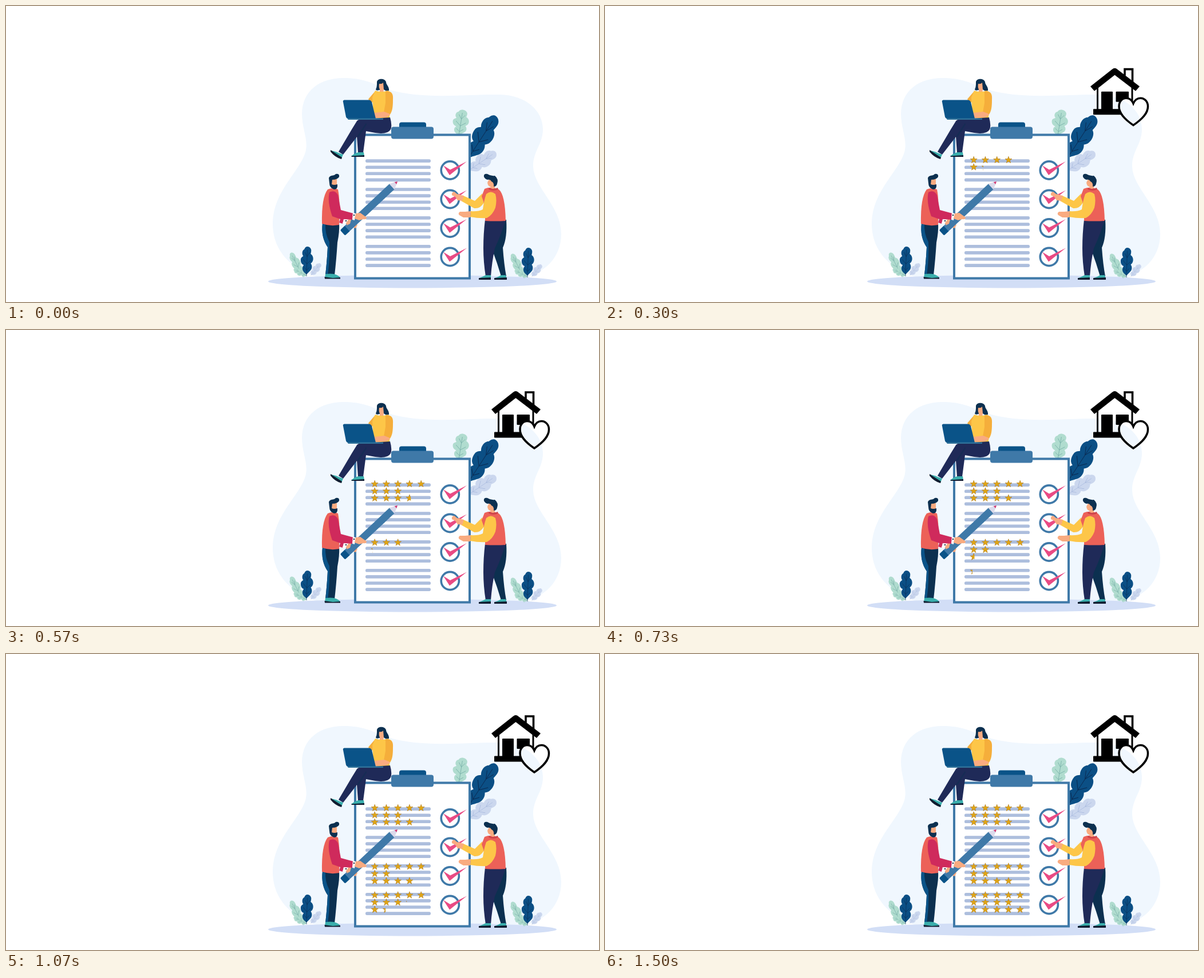
Recreate the animation shown at these times as an HTML page. Size 1036 by 518 pixels, loop 5010 ms.

```html
<!DOCTYPE html>
<html lang="en">
<head>
<meta charset="utf-8">
<title>Checklist</title>
<style>
  html, body { margin: 0; width: 100%; height: 100%; overflow: hidden; background: #fff; }
  #stage { display: block; width: 100vw; height: 100vh; }
  .clip { overflow: hidden; }
  .navy { fill: #1f2a58; } .ink { fill: #0c3050; } .blue { fill: #3f79a8; } .deep { fill: #0a5388; }
  .skin { fill: #f9ab80; } .coral { fill: #ec6158; } .rose { fill: #cf2a5c; }
  .sun { fill: #fdc648; } .amber { fill: #f5ae3b; } .teal { fill: #3aaeac; } .sole { fill: #101c30; }
  .mint { fill: #b0dccf; stroke: #70a9a4; } .pale { fill: #cbd7ee; stroke: #a9bade; }
  .dark { fill: #0b4f85; stroke: #0a2d55; }
</style>
</head>
<body>
<svg id="stage" viewBox="0 0 1036 518" preserveAspectRatio="none">
  <defs>
    <g id="leaf">
      <path stroke="none" d="M0 0C-4-3-11-5-11-11C-11-15-8-16-8-17C-14-18-17-23-16-28C-15-31-11-32-10-33C-14-36-14-43-8-45C-6-49-3-50 0-50C5-50 10-47 10-43C10-40 9-38 9-37C15-35 17-29 15-25C14-22 11-21 10-20C14-17 14-12 11-9C8-6 4-4 0 0Z"/>
      <path fill="none" stroke-width=".8" d="M0 3V-44M0-8L-7-13M0-8L7-13M0-19L-10-27M0-19L10-26M0-32L-6-40M0-32L6-40"/>
    </g>
    <g id="plant">
      <use href="#leaf" class="mint" transform="translate(518 472) rotate(-27) scale(.5 .9)"/>
      <use href="#leaf" class="mint" transform="translate(525 472) rotate(-62) scale(.4 .5)"/>
      <use href="#leaf" class="pale" transform="translate(533 471) rotate(39) scale(.4 .52)"/>
      <use href="#leaf" class="dark" transform="translate(525 470) rotate(2) scale(.68 .98)"/>
    </g>
    <path id="tick" fill="#e94b84" d="M764 279L776 286.5L805 272L775 296Z"/>
    <path id="heart" d="M923 207C907 196 898 186 898 174C898 165 904 159.500 910.500 159.500C917 159.500 921 164 923 169C925 164 929 159.500 935.500 159.500C942 159.500 948.500 165 948.500 174C948.500 186 939 196 923 207Z"/>
    <mask id="cut" maskUnits="userSpaceOnUse" x="840" y="90" width="120" height="130">
      <path fill="#fff" d="M840 90h120v130h-120z"/>
      <use href="#heart"/>
    </mask>
  </defs>

  <path fill="#f0f7fe" d="M590 126C625 126 638 135 665 145C725 165 805 154 862 155C910 156 938 184 938 216C938 242 920 255 921 281C922 318 970 350 970 399C970 440 941 469 900 476H548C500 462 466 430 466 381C466 325 513 290 523 256C529 234 517 216 517 188C518 149 547 126 590 126Z"/>
  <ellipse cx="710" cy="482" rx="252" ry="11.5" fill="#d2def6"/>

  <use href="#plant"/>
  <use href="#plant" x="386" y="2"/>
  <use href="#leaf" class="mint" transform="translate(791 227) rotate(9) scale(.88 .92)"/>
  <use href="#leaf" class="pale" transform="translate(808 288) rotate(56) scale(.8 1.15)"/>
  <use href="#leaf" class="dark" transform="translate(808 266) rotate(33) scale(1.12 1.75)"/>

  <!-- clipboard -->
  <rect x="610" y="225.5" width="200" height="251" fill="#fff" stroke="#3f79a8" stroke-width="4"/>
  <rect class="deep" x="687" y="203.5" width="47" height="14" rx="4"/>
  <rect class="blue" x="673" y="211.5" width="74" height="21" rx="4"/>
  <g id="lines" fill="#adbedd"></g>
  <g id="checks" fill="none" stroke="#3f79a8" stroke-width="3.6"></g>

  <!-- woman with laptop -->
  <path class="ink" d="M648 133C649 126 662 126 664 133C664 138 670 141 669 148Q664 150 660 146L652 147Q647 149 646 146C648 142 648 139 648 133Z"/>
  <path class="skin" d="M652 136Q657 137 659 134L660 146L659 152H653V146Q651 142 652 136Z"/>
  <path class="amber" d="M645 149L633 163L638 171L647 160Z"/>
  <path class="sun" d="M645 148Q656 152 667 148L673 152L670 196H642L640 160Z"/>
  <path class="amber" d="M663 149C674 148 677 154 676 164C676 177 675 185 670 191L660 186L663 170Z"/>
  <path class="skin" d="M643 187L661 185L671 189Q668 195 660 195L644 196Z"/>
  <path class="navy" d="M612 203Q614 198 623 198L671 195Q675 209 672 216Q668 223 655 223Q643 222 629 219L624 257H615L613 229L589 260L581 255L604 216Z"/>
  <path class="ink" opacity=".5" d="M613 229L629 205L630 207L616 229Z"/>
  <path class="deep" d="M591 164.5H635Q638 165 639 168L646 197H598Q595 197 594 194L589 168Q588 165 591 164.5Z"/>
  <path fill="#2f7199" d="M596 196.5H659V199H598Z"/>
  <path class="teal" d="M568 253Q575 254 581 257L589 260L586 267L570 258Z"/>
  <path class="sole" d="M567 252L587 265L586 268Q575 265 567 255Z"/>
  <path class="teal" d="M604 262Q609 258 615 256H625L626 263H604Z"/>
  <path class="sole" d="M603 262.5L626 261V264H604Z"/>

  <!-- man with pencil -->
  <path class="skin" d="M590 377L602 372L614 383L611 389L598 385Z"/>
  <path class="ink" d="M553 380H582Q583 394 579 414Q577 446 574 471H558Q561 444 562 422Q550 405 553 380Z"/>
  <path class="deep" d="M553 380L558 381Q557 398 565 413Q566 446 562 471H558Q561 444 562 422Q550 405 553 380Z"/>
  <path class="teal" d="M558 469Q567 468 573 469Q583 472 584 476H557Z"/>
  <path class="sole" d="M556.5 474L571 476L584 475V477.5H557Z"/>
  <path class="coral" d="M562 321Q571 317 580 321Q584 340 582 383Q567 386 552 381Q551 335 562 321Z"/>
  <path class="skin" d="M569 303H578V318Q573 323 568 318Z"/>
  <path class="ink" d="M564 301C566 295 573 298 576 294Q583 293 582 299Q579 304 570 304L569 312Q573 314 579 312Q580 321 573 321Q565 318 565 310Z"/>
  <g transform="translate(588 397) rotate(-43.2)">
    <path class="blue" d="M10-6.400H119V6.400H10Z"/>
    <path class="deep" d="M2-6.400H11V6.400H2Q0 6.400 0 4V-4Q0-6.400 2-6.400Z"/>
    <path fill="#dcdaeb" d="M118-6.400L131-1V1L118 6.400Z"/>
    <path fill="#d33a73" d="M127-2.600L131.500 0L127 2.600Z"/>
  </g>
  <path class="rose" d="M565 326Q575 321 580 331L585 357L607 363L605 374L590 373L588 381L582 379L584 373L570 368Q561 342 565 326Z"/>
  <path fill="#fff" d="M606 362L611 363L609 375L605 374ZM590 374L598 374L593 381L588 381Z"/>
  <path class="skin" d="M611 363L619 362L630 370Q630 374 624 373L617 375L609 372ZM597 375L603 374L601 381L595 384Z"/>
  <path class="sole" d="M607 365h2v2h-2zM593 375h2v2h-2z"/>

  <!-- man at the board -->
  <path class="ink" d="M856 374H874Q876 405 868 423Q870 452 874 473H865Q858 449 850 428Z"/>
  <path class="navy" d="M837 374H873Q866 398 854 424Q849 447 847 473H838Q834 448 834 424Q834 398 837 374Z"/>
  <path class="teal" d="M827 476Q832 474 838 471H847V478H827ZM854 476Q860 474 865 471H873L875 478H854Z"/>
  <path class="sole" d="M826 476L847 475V479H826ZM853 476L875 475V479H853Z"/>
  <path class="sun" d="M832 328Q833 339 835 344Q829 355 818 354L795 341L799 332L819 341Z"/>
  <path class="skin" d="M800 332L788 329L783 325Q778 326 779 331L785 334L789 340L797 341Z"/>
  <path class="coral" d="M836 320Q847 315 861 321Q872 330 873 376Q855 377 837 376Q838 349 831 333Z"/>
  <path class="skin" d="M844 303H854V319Q848 322 846 316Q842 316 841 309Z"/>
  <path class="ink" d="M835 299Q834 293 841 294Q847 298 854 297Q861 303 858 311Q857 316 852 316Q853 309 848 307Q846 303 841 304Q837 303 835 299Z"/>
  <path fill="#cf454b" d="M844 318Q850 322 859 318L860 321Q851 325 843 321Z"/>
  <path class="sun" d="M839 329Q847 322 855 329Q858 340 855 353Q850 366 840 371Q826 372 811 369L812 359Q825 360 833 356Q835 340 839 329Z"/>
  <path class="skin" d="M812 359L802 360L793 360Q789 363 792 366L799 370L811 370Z"/>

  <g id="stars" fill="#e2a612" stroke="#a8761f" stroke-width=".6"></g>

  <svg class="clip" x="840" y="90" width="120" height="122" viewBox="840 90 120 122">
    <g id="home">
      <g mask="url(#cut)">
        <path d="M890.500 107Q893 107 895 109L934 139L927 147L890.500 119L855 147L848 139L886 109Q888 107 890.500 107Z"/>
        <path fill="none" stroke="#000" stroke-width="3.6" d="M908 120V109H921.500V134"/>
        <path fill="none" stroke="#000" stroke-width="3" d="M860.500 140V181M921 138V181"/>
        <rect x="867" y="148" width="20" height="33" rx="1"/>
        <rect x="892.5" y="148" width="22.5" height="18" rx="1"/>
        <rect x="853" y="178.5" width="60" height="10" rx="1"/>
      </g>
      <use href="#heart" fill="none" stroke="#000" stroke-width="3.5"/>
    </g>
  </svg>
</svg>
<script>
const LOOP = 5010, WIPE = 430, WIDTH = 95;
const $ = id => document.getElementById(id);

for (let i = 0; i < 4; i++) {
  const dy = i * 50.5;
  $('checks').innerHTML += `<circle cx="775.8" cy="${287.5 + dy}" r="15.6"/><use href="#tick" y="${dy}" stroke="none"/>`;
  for (let j = 0; j < 4; j++)
    $('lines').innerHTML += `<rect x="628" y="${268.3 + i * 49.9 + j * 11.1}" width="114" height="5.6" rx="2.6"/>`;
}

const star = Array.from({ length: 10 }, (_, i) => {
  const r = i % 2 ? 2.6 : 6.3, a = i * Math.PI / 5;
  return `${(r * Math.sin(a)).toFixed(2)},${(-r * Math.cos(a)).toFixed(2)}`;
}).join(' ');

// centre y, number of stars, start of the wipe in ms
const rows = [
  [269.5, 5, 0], [282, 3, 157], [294.3, 4, 288],
  [372, 5, 325], [384.5, 2, 520], [397.2, 4, 648],
  [422, 5, 668], [434.7, 4, 810], [447.3, 5, 920]
];
$('stars').innerHTML = rows.map(([y, n]) =>
  `<svg class="clip" x="637" y="${y - 7.5}" width="0" height="15">` +
  Array.from({ length: n }, (_, i) =>
    `<polygon points="${star}" transform="translate(${7.2 + i * 20.25} 7.5)"/>`).join('') +
  '</svg>').join('');
const wipes = [...$('stars').children];

const progress = (t, start, length) => Math.min(1, Math.max(0, (t - start) / length));
const sineInOut = p => (1 - Math.cos(Math.PI * p)) / 2;
const expoOut = p => p < 1 ? 1 - 2 ** (-10 * p) : 1;

function draw(now) {
  const t = now % LOOP;
  const rise = 106 * (1 - expoOut(progress(t, 0, 500)));
  $('home').setAttribute('transform', `translate(0 ${rise})`);
  $('home').setAttribute('visibility', t < 30 ? 'hidden' : 'visible');
  rows.forEach(([, , start], i) =>
    wipes[i].setAttribute('width', WIDTH * sineInOut(progress(t, start, WIPE))));
}

const begin = performance.now();
function tick() {
  draw(performance.now() - begin);
  requestAnimationFrame(tick);
}
tick();
</script>
</body>
</html>
```
